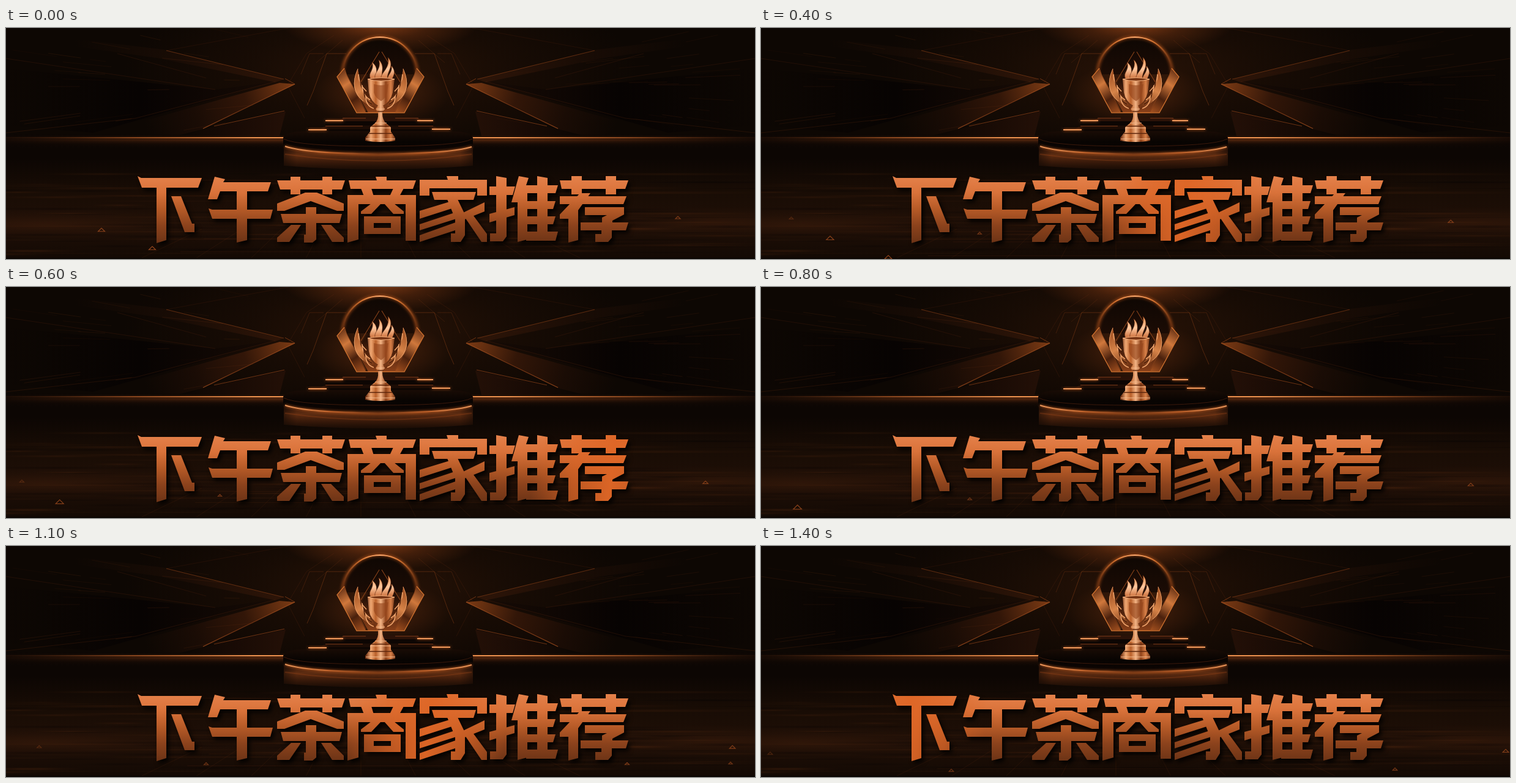
Write an HTML page with a canvas that moves like this. It is 1224 px wide and 379 px high and loops after 1500 ms.

```html
<!DOCTYPE html>
<html lang="zh">
<head>
<meta charset="utf-8">
<title>下午茶商家推荐</title>
<style>
html, body { margin: 0; width: 100%; height: 100%; overflow: hidden; background: #0b0603; }
canvas { display: block; width: 1224px; height: 379px; }
</style>
</head>
<body>
<canvas id="stage" width="1224" height="379" role="img" aria-label="下午茶商家推荐"></canvas>
<script>
const W = 1224, H = 379, CX = 612, LOOP = 1500, STEP = 100;
const view = document.getElementById('stage').getContext('2d');

function layer() {
  const c = document.createElement('canvas');
  c.width = W; c.height = H;
  return c.getContext('2d');
}

function ramp(g, x0, y0, x1, y1, stops) {
  const r = g.createLinearGradient(x0, y0, x1, y1);
  stops.forEach((s, i) => r.addColorStop(i / (stops.length - 1), s));
  return r;
}

function fill(g, d, style) {
  g.fillStyle = style;
  g.fill(new Path2D(d));
}

function line(g, d, style, width = 1) {
  g.strokeStyle = style;
  g.lineWidth = width;
  g.stroke(new Path2D(d));
}

function glow(g, x, y, rx, ry, rgb, alpha) {
  g.save();
  g.translate(x, y);
  g.scale(rx, ry);
  const r = g.createRadialGradient(0, 0, 0, 0, 0, 1);
  r.addColorStop(0, `rgba(${rgb},${alpha})`);
  r.addColorStop(.5, `rgba(${rgb},${alpha * .4})`);
  r.addColorStop(1, `rgba(${rgb},0)`);
  g.fillStyle = r;
  g.fillRect(-1, -1, 2, 2);
  g.restore();
}

// Draws once on each side of the vertical axis, x measured from the axis.
function mirror(g, draw) {
  for (const s of [1, -1]) {
    g.save();
    g.translate(CX, 0);
    g.scale(s, 1);
    draw(g);
    g.restore();
  }
}

let seed = 7;
const rand = () => (seed = (seed * 16807) % 2147483647) / 2147483647;

function drawWall(g) {
  g.fillStyle = '#0d0703';
  g.fillRect(0, 0, W, H);
  glow(g, CX, 70, 420, 150, '72,33,11', .45);
  glow(g, CX, -6, 160, 46, '190,84,28', .6);
  mirror(g, g => {
    fill(g, 'M158 84L350 36L612 4V14L360 50L172 89Z',
      ramp(g, 158, 0, 500, 0, ['#2e1508', '#190c05', '#0d0703']));
    fill(g, 'M172 88L270 101L612 66V160L470 172Z',
      ramp(g, 170, 0, 612, 0, ['#170b05', '#070302', '#0d0703']));
    fill(g, 'M140 92L165 90L300 128L470 176H330L290 166Z',
      ramp(g, 140, 92, 380, 175, ['#7d3b14', '#321608', '#1a0c05', '#0d0703']));
    fill(g, 'M155 137L290 166L320 177H165Z',
      ramp(g, 150, 0, 320, 0, ['#241007', '#190b05', '#0d0703']));
    line(g, 'M158 84L350 37', 'rgba(150,69,25,.55)');
    line(g, 'M350 37L150 0', 'rgba(110,48,18,.18)');
    line(g, 'M140 92L290 165', ramp(g, 140, 0, 290, 0, ['#a24f1e', '#6b3112', '#8a4219']), 1.3);
    line(g, 'M140 92L156 83M157 136L272 161', 'rgba(160,75,29,.65)');
    line(g, 'M172 88L400 148L612 172', 'rgba(122,56,22,.22)');
    line(g, 'M270 101L612 50M285 82L430 42', 'rgba(96,43,17,.25)');
    for (let i = 0; i < 22; i++) {
      const x = 190 + rand() * 340, y = 15 + rand() * 145, n = 25 + rand() * 75;
      const slope = (y - 96) / 330;
      line(g, `M${x} ${y}L${x + n} ${y + n * slope}`, `rgba(136,63,24,${.04 + rand() * .13})`);
    }
    // thin frame behind the podium
    line(g, 'M56 42H88L110 104L120 127', 'rgba(150,70,26,.45)');
    line(g, 'M93 42H116L130 76', 'rgba(140,65,24,.3)');
    line(g, 'M76 12L121 42L152 94L124 148', 'rgba(120,53,20,.2)');
    line(g, 'M62 20L105 57', 'rgba(137,63,23,.22)');
  });
}

function drawEmblem(g) {
  glow(g, CX, 110, 110, 55, '185,82,29', .35);
  g.beginPath();
  g.arc(611, 76, 61, Math.PI, 0);
  g.fillStyle = ramp(g, 0, 14, 0, 80, ['#0e0703', '#1c0c05']);
  g.fill();
  g.save();
  g.shadowColor = '#ef6d20';
  g.shadowBlur = 5;
  g.strokeStyle = ramp(g, 548, 0, 674, 0, ['#57260c', '#d1712f', '#ffab6f', '#d1712f', '#57260c']);
  g.lineWidth = 2.2;
  g.stroke();
  g.restore();
  fill(g, 'M614 38L653 105L636 139H592L573 105Z',
    ramp(g, 0, 38, 0, 139, ['#120703', '#2c1307', '#8a4019']));
  mirror(g, g => {
    fill(g, 'M71 80L59 66L55 77L24 138H39Z',
      ramp(g, 71, 70, 25, 138, ['#592810', '#d0783c', '#4a200c', '#a3501f']));
    line(g, 'M59 66L71 80L39 139H0', '#d1722f', 1.3);
    line(g, 'M59 66L55 78L24 136', '#8a431b', .8);
    line(g, 'M2 39L36 95', '#8a431a', 1.1);
  });
}

function drawPodium(g) {
  g.fillStyle = '#0c0603';
  g.fillRect(0, 178, W, 201);
  const dusk = ['rgba(12,6,3,.85)', 'rgba(12,6,3,.35)', 'rgba(12,6,3,0)', 'rgba(12,6,3,0)', 'rgba(12,6,3,0)', 'rgba(12,6,3,.35)', 'rgba(12,6,3,.85)'];
  g.fillStyle = ramp(g, 0, 176, 0, 198, ['rgba(150,68,24,0)', 'rgba(140,64,23,.55)', 'rgba(55,24,9,.25)', 'rgba(30,13,5,0)']);
  g.fillRect(0, 176, W, 22);
  g.fillStyle = ramp(g, 0, 0, W, 0,
    ['#6b3213', '#c4642a', '#ee9350', '#e98440', '#ee9350', '#c4642a', '#6b3213']);
  g.fillRect(0, 179, W, 2);
  g.fillStyle = ramp(g, 0, 0, W, 0, dusk);
  g.fillRect(0, 174, W, 24);

  // cylinder
  fill(g, 'M454 182V226Q608 238 763 226V182Z',
    ramp(g, 0, 195, 0, 234, ['#2b1208', '#5e2c11', '#3a1a0a', '#150a04']));
  fill(g, 'M454 182V230H475V182Z', ramp(g, 454, 0, 475, 0, ['rgba(12,6,3,.5)', 'rgba(12,6,3,0)']));
  fill(g, 'M763 182V230H742V182Z', ramp(g, 763, 0, 742, 0, ['rgba(12,6,3,.5)', 'rgba(12,6,3,0)']));
  line(g, 'M456 207Q608 229 761 207', 'rgba(140,64,24,.4)', 2);

  // steps and top disc
  fill(g, 'M522 147H698V161H726V172H493V161H522Z', '#0d0603');
  fill(g, 'M552 147H672L682 153H541Z', '#2b1208');
  fill(g, 'M522 160H698L707 166H513Z', '#1c0c05');
  fill(g, 'M453 180Q455 169 500 169H718Q761 169 763 180V194Q740 206 608 207Q476 206 453 194Z',
    ramp(g, 0, 168, 0, 206, ['#1a0c05', '#080402', '#0d0503']));
  line(g, 'M454 182Q476 194 608 194Q740 194 762 182', '#3a190b', 1);
  g.save();
  g.shadowColor = '#f07325';
  g.shadowBlur = 4;
  line(g, 'M456 194Q490 206 608 206.5Q726 206 761 195',
    ramp(g, 455, 0, 762, 0, ['#e8955a', '#c0622a', '#6d3314', '#b85d27', '#e8955a']), 2);
  line(g, 'M522 152H551M672 152H698M494 167H524M696 166H726', '#f0995c', 2.2);
  g.restore();
  line(g, 'M550 148H588M636 148H674M522 161H583M641 161H698', '#7d3b19', 1);
}

function drawTrophy(g) {
  const metal = ramp(g, -24, 0, 25, 0, ['#6b2c0f', '#f0a873', '#b9602a', '#f2b384', '#8f4219', '#d98149', '#5a240b']);
  mirror(g, g => {
    fill(g, 'M37 66Q53 102 28 121Q16 130 6 134Q12 122 20 117Q33 100 37 66Z',
      ramp(g, 10, 130, 42, 70, ['#6d3011', '#d78449', '#9a4a1d']));
    for (let i = 0; i < 5; i++) {
      const x = 37 - i * 3, y = 84 + i * 9;
      line(g, `M${x - 1} ${y - 8}Q${x - 1} ${y + 8} ${x - 14} ${y + 20 - i * 2}`, i % 2 ? '#4f200a' : '#f0a46c', 1.6);
    }
    line(g, 'M37 67Q52 101 28 120', '#e59a63', 1);
  });
  g.save();
  g.translate(CX, 0);
  const flame = ramp(g, 0, 48, 0, 86, ['#e88a48', '#ffc99f', '#c3602a']);
  for (const d of [
    'M-16 84C-22 73 -9 70 -14 56C-1 66 -10 74 -4 85Z',
    'M-8 85C-14 74 3 69 -3 52C9 63 -1 74 4 85Z',
    'M2 85C-4 75 17 68 12 48C25 62 8 73 12 85Z',
    'M12 85C10 77 20 74 18 62C27 73 20 79 19 85Z'
  ]) {
    fill(g, d, flame);
    line(g, d, 'rgba(80,32,10,.7)', .8);
  }
  fill(g, 'M-21 84Q2 79 23 84L20 106Q16 122 3 128H-3Q-16 121 -19 106Z', metal);
  fill(g, 'M-21 84Q1 79 23 84Q1 90 -21 84Z', '#7a3614');
  line(g, 'M-21 84Q1 79 23 84Q1 90 -21 84Z', '#f5b07c', 1);
  fill(g, 'M-11 92Q1 96 13 92L11 106Q9 115 1 120Q-9 114 -11 106Z', 'rgba(150,70,29,.65)');
  fill(g, 'M-4 127H4L7 133L3 139Q3 151 9 156L17 163V170L24 180V185Q0 189 -25 185V180L-17 170V163L-9 156Q-3 151 -4 139L-8 133Z', metal);
  line(g, 'M-7 133H7M-9 156H10M-17 164H17M-24 182H24', '#f7bd90', 1);
  line(g, 'M-5 137H5M-15 161H15M-19 173H19', '#5f270d', 1.4);
  g.restore();
}

function drawFloor(g) {
  g.fillStyle = ramp(g, 0, 213, 0, H, ['rgba(26,13,5,0)', 'rgba(26,13,5,.9)', 'rgba(33,16,7,.9)', 'rgba(20,10,4,.9)']);
  g.fillRect(0, 213, W, H - 213);
  glow(g, 60, 322, 300, 26, '130,60,21', .16);
  glow(g, 1160, 320, 280, 26, '130,60,21', .15);
  for (let i = 0; i < 130; i++) {
    const y = 238 + rand() * 132, x = rand() * W - 100, n = 90 + rand() * 260;
    const lit = rand() < .5;
    const rgb = lit ? '115,54,19' : '7,3,2', a = lit ? .13 : .28;
    g.fillStyle = ramp(g, x, 0, x + n, 0, [`rgba(${rgb},0)`, `rgba(${rgb},${a})`, `rgba(${rgb},0)`]);
    g.fillRect(x, y, n, 1 + rand() * 3);
  }
  g.fillStyle = '#0a0502';
  g.fillRect(0, 377, W, 2);
}

const glyphs = [
  // 下
  'M215 243L221 246H320L314 262H222Z|M246 260H262V348L246 353Z|M270 276H286L304 321H308V335H292Z',
  // 午
  'M341 244L358 248L355 253H433L428 268H350L345 281H330Z|M331 296L337 298H436L432 313H337Z|M377 266H394V348L377 352Z',
  // 茶
  'M443 250H554L549 265H448Z|M465 244H481V273H465Z|M517 244H533V273H517Z',
  'M489 270H508L552 288V300H541L498 284L455 300H443V288Z|M449 305H549L545 320H453Z|M490 294H507V347L501 352H487V339H490Z',
  'M466 323H482L463 351H443V344Z|M515 323H531L552 344V351H533Z',
  // 商
  'M560 250H606L604 244H622V250H670L665 264H563Z|M580 263H597L601 276H585Z|M633 263H650L643 276H627Z',
  'M558 274H670V349H653V289H576V347L558 352Z|M597 288H613L597 305H580V301Z|M618 288H634L650 301V305H633Z',
  'M585 309H645V338H585ZM601 320V328H629V320Z',
  // 家
  'M676 249H722L720 243H739V249H786V275H770V263H692V275H676Z|M696 269H768L764 282H700Z',
  'M721 281H738L750 306V340L743 351H727V337H734V313Z|M676 300L735 282V294L676 313Z|M676 322L739 301V312L676 332Z',
  'M676 340L743 316V329L676 351Z|M782 286L747 303V315L782 301Z|M748 308H764L786 338V351H777Z',
  // 推
  'M790 260H832L828 274H790Z|M801 243L818 246V342L812 350H791V337H801Z|M790 305L831 294V307L790 319Z',
  'M838 243L854 246L850 258H902L898 271H847L839 286H826Z|M836 270H852V347L836 351Z|M850 284H898L894 297H850Z',
  'M850 309H898L894 322H850Z|M850 334H902L898 349H850Z|M868 243L885 246V337H868Z',
  // 荐
  'M905 250H1017L1012 264H908Z|M924 243H941V273H924Z|M980 243H997V273H980Z|M905 276H1014L1009 289H905Z',
  'M938 271H955L935 299V348L919 352V313H905V306Z|M946 294H1010V306L991 316V321H974V311L982 307H946Z',
  'M939 319H1017L1013 332H939Z|M973 319H990V344L984 351H963V338H973Z'
];

function drawTitle(g) {
  const ink = ramp(g, 0, 243, 0, 352, ['#e5814a', '#d9723a', '#b55a27', '#8b421c', '#6d3416']);
  glyphs.join('|').split('|').forEach(d => fill(g, d, ink));
}

const scene = layer(), title = layer(), shine = layer();
drawWall(scene);
drawEmblem(scene);
drawPodium(scene);
drawTrophy(scene);
drawFloor(scene);
drawTitle(title);

// start ms, end ms, x and y at start, x and y at end, width, opacity
const markers = [
  [0, 400, 239, 361, 208, 376, 11, .75],
  [0, 1000, 156, 331, 28, 371, 11, .65],
  [0, 1400, 1098, 311, 1217, 336, 8, .6],
  [100, 700, 80, 303, 13, 322, 6, .3],
  [300, 1400, 361, 334, 311, 368, 6, .5],
  [200, 300, 844, 368, 851, 373, 9, .6],
  [900, 1100, 1148, 350, 1184, 356, 6, .5],
  [1100, 1400, 1015, 357, 1036, 366, 7, .6],
  [1200, 1300, 690, 372, 693, 376, 8, .6],
  [1000, 1400, 66, 326, 15, 340, 7, .3]
];

function drawMarkers(g, t) {
  for (const [t0, t1, x0, y0, x1, y1, w, a] of markers) {
    if (t < t0 || t > t1) continue;
    // approaching a viewer: reciprocal depth falls evenly
    const p = (t - t0) / (t1 - t0), d0 = y0 - 203, d1 = y1 - 203;
    const d = 1 / ((1 - p) / d0 + p / d1), k = (d - d0) / (d1 - d0);
    const x = x0 + (x1 - x0) * k, y = 203 + d;
    const r = w / 2 * d / d0, h = r * .5;
    line(g, `M${x - r} ${y + h}L${x} ${y - h}L${x + r} ${y + h}Z`, `rgba(190,90,37,${a})`, 1.2);
  }
}

function drawGrid(g, t) {
  const tint = 'rgba(140,62,23,.13)';
  g.save();
  g.beginPath();
  g.rect(0, 330, W, 47);
  g.clip();
  for (let i = -4; i <= 4; i++) line(g, `M${580 + i * 65} 330L${580 + i * 90} 378`, tint);
  for (let i = 0; i < 3; i++) {
    const y = 203 + 1 / (.0079 - i * .0009 - t * 6e-7);
    line(g, `M${580 - (y - 203) * 1.8} ${y}H${580 + (y - 203) * 2}`, tint);
  }
  g.restore();
}

function drawShine(t) {
  const x = 90 + 1.5 * Math.min(t, LOOP - t);
  shine.globalCompositeOperation = 'copy';
  shine.drawImage(title.canvas, 0, 0);
  shine.globalCompositeOperation = 'source-atop';
  const clear = 'rgba(222,102,38,0)', half = 'rgba(222,102,38,.6)', full = 'rgba(222,102,38,.96)';
  shine.fillStyle = ramp(shine, x - 125, 285, x + 125, 315, [clear, half, full, half, clear]);
  shine.fillRect(0, 235, W, 125);
}

function render(t) {
  view.drawImage(scene.canvas, 0, 0);
  drawGrid(view, t);
  drawMarkers(view, t);
  drawShine(t);
  view.save();
  view.shadowColor = 'rgba(0,0,0,.85)';
  view.shadowBlur = 7;
  view.shadowOffsetX = 4;
  view.shadowOffsetY = 5;
  view.drawImage(shine.canvas, 0, 0);
  view.restore();
}

const start = performance.now();
function tick() {
  const t = (performance.now() - start) % LOOP;
  render(Math.floor(t / STEP) * STEP);
  requestAnimationFrame(tick);
}
tick();
</script>
</body>
</html>
```
